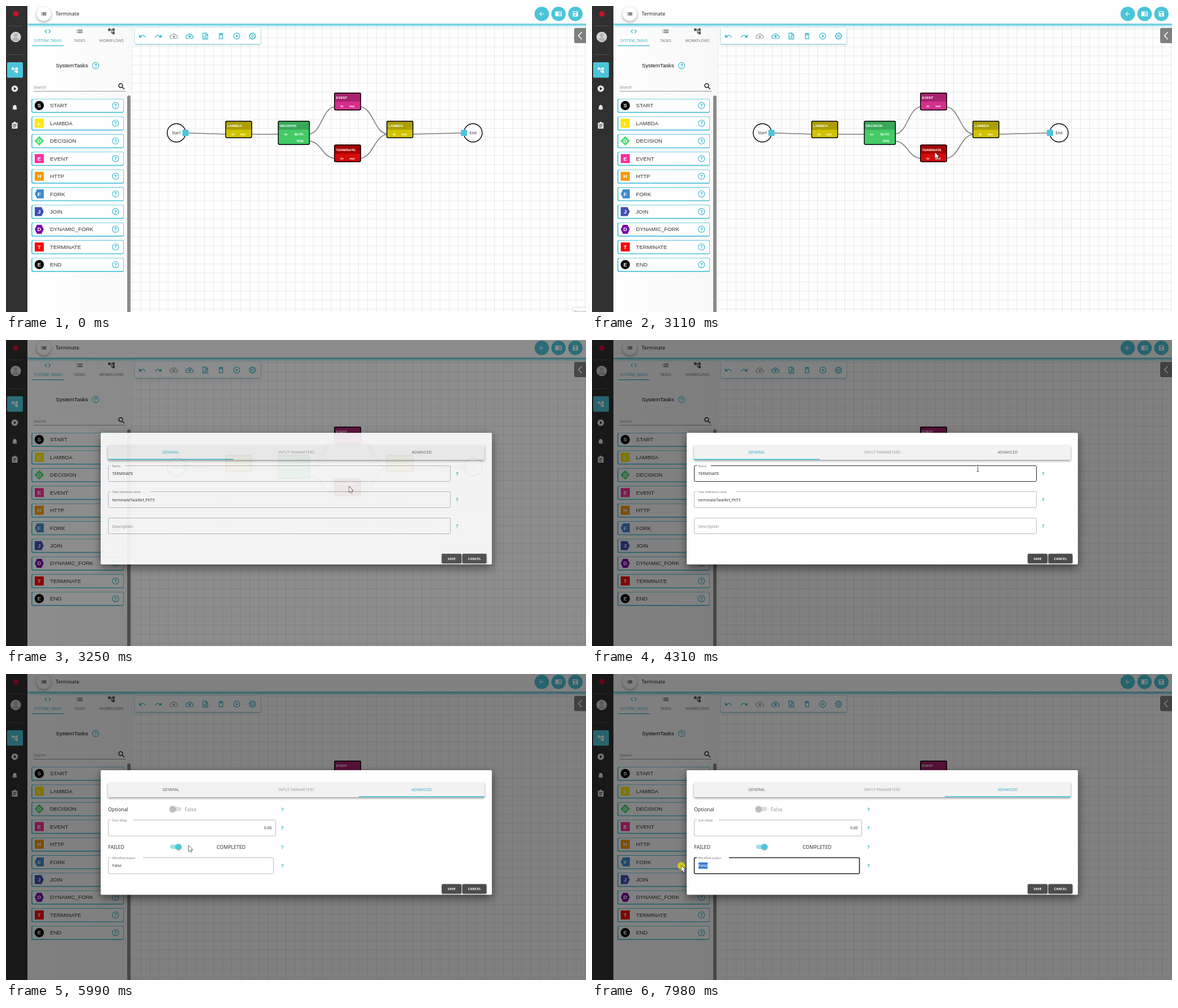
These frames come from a looping animation (1029x544 px, 8 s). An HTML page with a canvas:

```html
<!DOCTYPE html>
<html lang="en">
<head>
<meta charset="utf-8">
<title>Workflow builder</title>
<style>
html, body { margin: 0; width: 100%; height: 100%; overflow: hidden; background: #fff; }
canvas { display: block; width: 100vw; height: 100vh; }
</style>
</head>
<body>
<canvas id="stage" width="1029" height="544"></canvas>
<script>
const W = 1029, H = 544, LOOP = 8000;
const CYAN = '#4bc5da', TEAL = '#2fb5cb', DARK = '#333';
const SANS = '"Noto Sans", "Open Sans", sans-serif';
const ARIAL = '"Liberation Sans", Arial, sans-serif';
const screen = document.getElementById('stage').getContext('2d');
let g = screen;

function layer() {
  const c = document.createElement('canvas');
  c.width = W;
  c.height = H;
  return c.getContext('2d');
}

// ---------- drawing helpers ----------
function rect(x, y, w, h, color) {
  g.fillStyle = color;
  g.fillRect(x, y, w, h);
}
function rounded(x, y, w, h, r, fill, stroke, lw = 1) {
  g.beginPath();
  g.roundRect(x, y, w, h, r);
  paint(fill, stroke, lw);
}
function circle(x, y, r, fill, stroke, lw = 1) {
  g.beginPath();
  g.arc(x, y, r, 0, Math.PI * 2);
  paint(fill, stroke, lw);
}
function paint(fill, stroke, lw) {
  if (fill) { g.fillStyle = fill; g.fill(); }
  if (stroke) { g.strokeStyle = stroke; g.lineWidth = lw; g.stroke(); }
}
function shadow(color, blur, dy, draw) {
  g.save();
  g.shadowColor = color;
  g.shadowBlur = blur;
  g.shadowOffsetY = dy;
  draw();
  g.restore();
}
// y is the middle of the capital letters
function text(s, x, y, size, color, align = 'left', font = SANS, weight = 400) {
  g.font = `${weight} ${size}px ${font}`;
  g.fillStyle = color;
  g.textAlign = align;
  g.fillText(s, x, y + size * 0.36);
}

// Icons on a 24 unit grid: [stroked path, filled path]
const RING = 'M21 12a9 9 0 1 1-18 0a9 9 0 1 1 18 0z';
const CLOUD = 'M6 19a5 5 0 0 1 0-10a7 7 0 0 1 13 2a4 4 0 0 1 0 8z';
const ICONS = {
  undo: ['M6 13q9-8 15 3', 'M2 7v9h9z'],
  redo: ['M18 13q-9-8-15 3', 'M22 7v9h-9z'],
  upload: [CLOUD, 'M12 9l5 5h-3v3h-4v-3h-3z'],
  download: [CLOUD, 'M12 17l5-5h-3v-3h-4v3h-3z'],
  doc: ['M5 3h9l5 5v13h-14zM13 3v6h6M8 13h8M8 17h8', ''],
  bin: ['M7 8h10v12h-10zM5 5h14M9 4h6', ''],
  play: [RING, 'M10 7.5l6 4.5l-6 4.5z'],
  tree: ['M9 7h6M12 7v10h4', 'M2 3h7v8h-7zM15 3h7v8h-7zM15 13h7v8h-7z'],
  list: ['M7 8h14M7 12h14M7 16h14M3 8h2M3 12h2M3 16h2', ''],
  code: ['M9 6l-6 6l6 6M15 6l6 6l-6 6', ''],
  search: ['M15 9.5a5.5 5.5 0 1 1-11 0a5.5 5.5 0 1 1 11 0zM14 14l6 6', ''],
  back: ['M20 12h-15M12 5l-7 7l7 7', ''],
  book: ['M2 5h20v14h-20zM14 10h6M14 13h6M14 16h6', 'M2 5h10v14h-10z'],
  bell: ['', 'M4 19v-1l2-2v-5q0-6 6-7q6 1 6 7v5l2 2v1zM10 20h4q-2 4-4 0z'],
};
function icon(name, x, y, size, color, lw = 2) {
  const [line, solid] = ICONS[name];
  g.save();
  g.translate(x - size / 2, y - size / 2);
  g.scale(size / 24, size / 24);
  g.strokeStyle = g.fillStyle = color;
  g.lineWidth = lw;
  g.stroke(new Path2D(line));
  g.fill(new Path2D(solid));
  g.restore();
}
function help(x, y) {
  circle(x, y, 5.6, null, TEAL, 1.1);
  text('?', x, y, 8.5, TEAL, 'center', ARIAL, 700);
}
function gear(x, y) {
  g.beginPath();
  for (let i = 0; i < 32; i++) {
    const r = i % 4 < 2 ? 5.8 : 4.4, a = (i + 0.5) * Math.PI / 16;
    g.lineTo(x + r * Math.cos(a), y + r * Math.sin(a));
  }
  g.closePath();
  paint(null, TEAL, 1.2);
  circle(x, y, 1.8, null, TEAL, 1.1);
}

// ---------- page ----------
function drawGrid() {
  const pitch = 16.08;
  rect(38, 32, W, H, '#fff');
  for (let x = 38 + pitch / 2; x < W; x += pitch) rect(x, 32, 1, H, '#e9e9e9');
  for (let y = 32 + pitch / 2; y < H; y += pitch) rect(38, y, W, 1, '#e9e9e9');
}

// Links run between port centres, which sit just inside the node edges
function link(x1, y1, x2, y2, bend = 0) {
  g.beginPath();
  g.moveTo(x1 - 4, y1);
  g.bezierCurveTo(x1 - 4 + bend, y1, x2 + 4 - bend, y2, x2 + 4, y2);
  paint(null, '#7a7a7a', 1.6);
}

function node(x, y, w, h, title, head, body, outs) {
  rounded(x, y, w, h, 3, body);
  rounded(x, y, w, 16, [3, 3, 0, 0], head);
  rounded(x + 0.7, y + 0.7, w - 1.4, h - 1.4, 2.5, null, '#000', 1.4);
  text(title, x + 3.5, y + 9, 6, '#fff', 'left', ARIAL, 700);
  text('in', x + 14, y + 24, 6, '#fff', 'center', ARIAL, 700);
  outs.forEach((s, i) => text(s, x + w - 11.5, y + 24 + i * 12, 6, '#fff', 'right', ARIAL, 700));
}

function terminal(x, label, portX) {
  circle(x, 225.5, 16.3, '#fff', '#000', 1.4);
  text(label, x, 225.5, 7, DARK, 'center');
  rounded(portX, 220, 11, 11, 1.5, CYAN);
}

function drawDiagram() {
  link(319, 225.5, 390, 228);
  link(436, 228, 483, 228);
  link(539, 228, 582, 179, 27);
  link(539, 240, 582, 271, 27);
  link(630, 179, 675, 228, 27);
  link(630, 271, 675, 228, 27);
  link(722, 228, 812, 225.5);
  terminal(302.3, 'Start', 313);
  terminal(828.5, 'End', 807);
  node(389, 204, 47.5, 31, 'LAMBDA', '#ab9f00', '#d3c400', ['out']);
  node(482.5, 204, 56.5, 43, 'DECISION', '#38a858', '#43cc66', ['BLTO', 'TDN']);
  node(582, 154, 48, 31.5, 'EVENT', '#a9226f', '#d42e8d', ['out']);
  node(582, 246.5, 48, 31, 'TERMINATE', '#a60000', '#d60a0a', ['out']);
  node(675, 204, 47.5, 31, 'LAMBDA', '#ab9f00', '#d3c400', ['out']);
}

function drawSidebar() {
  rect(0, 0, 38, H, '#303030');
  circle(17.5, 14, 5, '#c4122f');
  rect(3, 35, 27, 1, '#505050');
  rect(3, 86, 27, 1, '#505050');
  circle(17.2, 55, 9.3, '#d4d4d4');
  circle(17.2, 52, 3.4, '#b4b4b4');
  g.beginPath();
  g.arc(17.2, 62, 6, Math.PI, 0);
  paint('#b4b4b4');
  rounded(2, 100, 28, 27.5, 2, CYAN);
  icon('tree', 15.5, 114, 13, '#fff');
  circle(15.5, 147, 5.8, '#e8e8e8');
  g.fillStyle = '#303030';
  g.fill(new Path2D('M14 144l4.4 3l-4.4 3z'));
  icon('bell', 15.5, 180, 13, '#e8e8e8');
  rounded(10.5, 207.5, 10, 10.5, 1, '#e8e8e8');
  circle(15.5, 207.3, 1.7, '#e8e8e8');
  for (let i = 0; i < 3; i++) rect(12.5, 210 + i * 2.4, i < 2 ? 6 : 4, 1, '#303030');
}

const TASKS = [
  ['START', '#000', 'circle'], ['LAMBDA', '#ffe600', 'square'], ['DECISION', '#4ade73', 'diamond'],
  ['EVENT', '#fb2d9c', 'square'], ['HTTP', '#f79a05', 'square'], ['FORK', '#3f8ad2', 'left'],
  ['JOIN', '#3f51b5', 'right'], ['DYNAMIC_FORK', '#7b09a5', 'hex'],
  ['TERMINATE', '#f80404', 'square'], ['END', '#000', 'circle'],
];
const SHAPES = {
  diamond: 'M0-8.5L8.5 0L0 8.5L-8.5 0z',
  square: 'M-8-8h16v16h-16z',
  left: 'M-4-8h12v16h-12l-4-8z',
  right: 'M-8-8h12l4 8l-4 8h-12z',
  hex: 'M-4-8h8l4 8l-4 8h-8l-4-8z',
};

function drawTask([name, color, shape], i) {
  const y = 177 + i * 31.42;
  rounded(45, y - 12, 164, 25, 3, CYAN);
  rounded(46.7, y - 11.2, 161.5, 22.5, 2.5, '#fff');
  if (shape === 'circle') circle(59, y, 8.2, color);
  else {
    g.save();
    g.translate(59, y);
    g.fillStyle = color;
    g.fill(new Path2D(SHAPES[shape]));
    g.restore();
  }
  text(name[0], 59, y, 9.5, '#fff', 'center', ARIAL, 700);
  text(name, 78, y, 9.7, '#333', 'left', ARIAL);
  help(194.3, y);
}

function drawPanel() {
  const tint = g.createLinearGradient(38, 0, 222, 0);
  tint.addColorStop(0, '#fff');
  tint.addColorStop(1, '#f9f9f9');
  rect(38, 32, 184, H - 32, tint);
  icon('code', 74, 45, 13, TEAL);
  icon('list', 130.5, 45, 14, '#555');
  icon('tree', 187, 45, 14, '#555');
  text('SYSTEM_TASKS', 74.5, 61.5, 7, TEAL, 'center');
  text('TASKS', 130.7, 61.5, 7, '#777', 'center');
  text('WORKFLOWS', 187, 61.5, 7, '#777', 'center');
  rect(46, 70, 56.5, 1.2, TEAL);
  text('SystemTasks', 88.5, 106, 9.7, '#111', 'left', ARIAL);
  help(159, 106);
  text('Search', 49, 144.5, 7, '#888');
  icon('search', 205, 143, 15, '#222', 2.4);
  rect(49, 151, 163, 1, '#999');
  TASKS.forEach(drawTask);
  rounded(215, 159, 6, H, 3, '#8a8a8a');
}

function drawHeader() {
  shadow(CYAN, 5, 1.5, () => rect(38, 0, W, 33, CYAN));
  rect(38, 0, W, 31.5, '#fff');
  shadow('rgba(0,0,0,.35)', 5, 2, () => circle(67, 14, 12.7, '#fff'));
  icon('list', 67, 14, 12, '#222', 2.4);
  text('Terminate', 88, 14, 8.8, '#222');
  ['back', 'book'].forEach((name, i) => {
    circle(950.5 + i * 29.8, 14, 12.8, CYAN);
    icon(name, 950.5 + i * 29.8, 14, 12.5, '#fff');
  });
  circle(1010.2, 14, 12.8, CYAN);
  rounded(1005.5, 9.3, 9.4, 9.4, [1, 3, 1, 1], '#fff');
  rect(1006.8, 10.4, 5.6, 2.2, CYAN);
  circle(1010.2, 15.8, 1.6, CYAN);
}

function drawToolbar() {
  shadow('rgba(40,150,170,.7)', 3, 1, () => rounded(228.5, 39, 223, 28.5, 1, '#fff'));
  const names = ['undo', 'redo', 'upload', 'download', 'doc', 'bin', 'play'];
  names.forEach((n, i) => icon(n, 242 + i * 27.9, 53.5, 14.5, n === 'upload' ? '#a5a5a5' : TEAL));
  gear(437.3, 53.5);
  rounded(1008, 39, 24, 27, 3, '#808080');
  g.beginPath();
  g.moveTo(1021.5, 46.5);
  g.lineTo(1015.5, 52.7);
  g.lineTo(1021.5, 59);
  paint(null, '#fff', 1.6);
}

function drawPage() {
  drawGrid();
  drawDiagram();
  drawToolbar();
  drawPanel();
  drawHeader();
  drawSidebar();
}

// ---------- timing ----------
// Busy stretches: start, end, number of picture updates
const BURSTS = [
  [0, 0, 1], [70, 70, 1], [530, 1130, 9], [1270, 1390, 2], [1720, 2280, 9], [2680, 2890, 4],
  [3110, 3370, 5], [3900, 4560, 10], [4960, 5720, 12], [5790, 6540, 11], [6610, 6610, 1],
  [6750, 6950, 3], [7090, 7840, 12], [7910, 7980, 2],
];
function snap(t) {
  const [a, b, n] = BURSTS.filter(s => s[0] <= t).pop();
  if (n < 2) return a;
  const dt = (b - a) / (n - 1);
  return a + dt * Math.min(n - 1, Math.floor((t - a) / dt + 1e-6));
}

const clamp = v => Math.max(0, Math.min(1, v));

// cubic-bezier(.4, 0, .2, 1)
function ease(x) {
  x = clamp(x);
  let lo = 0, hi = 1;
  for (let i = 0; i < 20; i++) {
    const s = (lo + hi) / 2, q = 1 - s;
    if (1.2 * q * q * s + 0.6 * q * s * s + s * s * s < x) lo = s;
    else hi = s;
  }
  return 3 * lo * lo - 2 * lo * lo * lo;
}

// Pointer stops: time, x, y
const PATH = [
  [530, 1018, 541], [680, 880, 462], [830, 785, 408], [980, 736, 383], [1130, 717.5, 374.5],
  [1270, 716.5, 374.5], [1390, 717.5, 374.5], [1650, 717.5, 374.5], [1790, 683, 345],
  [1930, 633.5, 300.5], [2070, 616, 275], [2280, 608.5, 260.5], [3830, 608.5, 260.5],
  [4230, 678, 232], [4560, 736.5, 199.5], [5240, 736.5, 199.5], [5480, 540, 252],
  [5720, 391, 291], [5930, 325, 305], [6130, 302, 307], [6540, 301, 307], [6610, 301, 307.5],
  [7160, 301, 307.5], [7400, 212, 341], [7500, 212, 341], [7840, 179, 341], [7980, 158.5, 341],
];
function pointerAt(t) {
  const i = PATH.findIndex(p => p[0] >= t);
  if (i <= 0) return i ? PATH[PATH.length - 1].slice(1) : PATH[0].slice(1);
  const a = PATH[i - 1], b = PATH[i], k = (t - a[0]) / (b[0] - a[0]);
  return [a[1] + (b[1] - a[1]) * k, a[2] + (b[2] - a[2]) * k];
}

const PRESSES = [[2680, 2750], [2820, 2890], [4960, 5130], [6220, 6350], [6950, 7090], [7500, LOOP]];
const pressed = t => PRESSES.some(([a, b]) => t >= a && t < b);

const within = ([px, py], x, y, w, h) => px >= x && px <= x + w && py >= y && py <= y + h;

// ---------- dialog ----------
const TAB_SWITCH = 5137, TAB_READY = 3200;
const FIELDS = [
  [[181, 223.5, 607.5, 28], [181, 269.5, 607.5, 28.5], [181, 316.5, 607.5, 28]],
  [[181, 259.5, 297.5, 28.5], [181, 326.5, 293.5, 28.5]],
];

function field(box, label, gap, hover, focus) {
  const [x, y, w, h] = box;
  rounded(x + 0.5, y, w - 0.5, h, 2, null, hover || focus ? '#222' : '#b9b9b9', focus ? 1.6 : 1);
  if (label) {
    rect(x + 5, y - 1.5, gap - x - 5, 3, '#fff');
    text(label, x + 7.5, y + 0.5, 5.2, '#777');
  }
}
const mark = (x, y) => text('?', x, y, 9, TEAL, 'center', SANS, 700);

function button(x, y, w, label) {
  shadow('rgba(0,0,0,.4)', 3, 1, () => rounded(x, y, w, 17, 2, '#4c4c4c'));
  text(label, x + w / 2, y + 8.5, 5.9, '#fff', 'center', SANS, 600);
}

function toggle(y, on, colors, halo) {
  const x = 295.5 + on * 10.5;
  rounded(291, y - 3.7, 20, 7.4, 3.7, colors.track);
  if (halo) circle(x, y, 9.5, 'rgba(60,50,20,.07)');
  shadow('rgba(0,0,0,.4)', 2, 0.7, () => circle(x, y, 5.4, colors.knob));
}

function drawTabs(y, t, tab) {
  shadow('rgba(0,0,0,.4)', 4, 2, () => rect(181, y, 668, 26.5, '#f2f2f2'));
  const r = 112 * ease((t - 4960) / 550);
  const fade = 1 - ease((t - TAB_SWITCH) / 550);
  if (t >= 4960 && fade > 0) {
    g.save();
    g.beginPath();
    g.rect(626, y, 223, 26.5);
    g.clip();
    circle(736, y + 13, r, `rgba(75,197,218,${0.28 * fade})`);
    g.restore();
  }
  const slide = 445 * ease((t - TAB_SWITCH) / 300);
  if (t >= TAB_READY) rect(181 + slide, y + 24.8, 223, 1.7, CYAN);
  text('GENERAL', 292.3, y + 13.2, 6.8, tab ? '#666' : TEAL, 'center');
  text('INPUT PARAMETERS', 515, y + 13.2, 6.8, '#a0a0a0', 'center');
  text('ADVANCED', 737.5, y + 13.2, 6.8, tab ? TEAL : '#666', 'center');
}

function drawGeneral(at) {
  const boxes = FIELDS[0], labels = ['Name', 'Task reference name', ''], gaps = [211, 256, 0];
  boxes.forEach((b, i) => {
    field(b, labels[i], gaps[i], within(at, ...b));
    mark(800.5, b[1] + 14.3);
  });
  text('TERMINATE', 188.7, 238, 6.8, DARK);
  text('terminateTaskRef_PKT5', 188.7, 284.3, 6.8, DARK);
  text('Description', 188.7, 332, 6.8, '#8a8a8a');
}

function drawAdvanced(t, at) {
  const [delay, output] = FIELDS[1];
  text('Optional', 181, 240.5, 8.8, DARK);
  toggle(240, 0, { track: '#dedede', knob: '#bdbdbd' });
  text('False', 317, 240.5, 8.8, '#999');
  field(delay, 'Start delay', 225, within(at, ...delay));
  text('0.00', 471.5, 274, 6.8, DARK, 'right');

  text('FAILED', 181, 307.5, 8.8, DARK);
  const on = t < 7090 ? 1 - ease((t - 6350) / 150) : ease((t - 7020) / 150);
  const colors = on > 0.5 ? { track: '#a0dfea', knob: CYAN } : { track: '#9c9c9c', knob: '#fafafa' };
  toggle(307.3, on, colors, within(at, 286, 298, 30, 19));
  text('COMPLETED', 373.7, 307.5, 8.8, DARK);

  field(output, 'Workflow output', 243, within(at, ...output), t >= 7500);
  text('False', 188.7, 341, 6.8, DARK);
  if (t > 7500) {
    const left = Math.max(188.7, at[0]);
    if (left < 205) {
      g.save();
      g.beginPath();
      g.rect(left, 335, 205 - left, 11.5);
      g.clip();
      rect(left, 335, 205 - left, 11.5, '#3a7bd5');
      text('False', 188.7, 341, 6.8, '#fff');
      g.restore();
    }
  }
  [240.5, 274, 307.5, 341].forEach(y => mark(490.3, y));
}

function drawDialog(t, at) {
  const tab = t >= TAB_SWITCH;
  const top = tab ? 171 : 165, bottom = tab ? 392.5 : 399;
  shadow('rgba(0,0,0,.5)', 16, 6, () => rounded(168, top, 694, bottom - top, 2, '#fff'));
  drawTabs(top + 21.5, t, tab);
  if (tab) drawAdvanced(t, at);
  else drawGeneral(at);
  button(773, bottom - 19, 35, 'SAVE');
  button(809.5, bottom - 19, 43, 'CANCEL');
}

// ---------- pointer ----------
const POINTERS = {
  arrow: 'M0 0v10l2.4-2.2l1.6 3.6l1.6-.7l-1.6-3.5h3.2z',
  hand: 'M-1 0q1.2-1 2 0v5l4 1q1.2.3 1 1.6l-.8 4.4h-5.2l-3.4-4q0-1.6 1.6-.8l.8.6z',
  move: 'M0-6.5l2.3 2.6h-1.5v3.1h3.1v-1.5l2.6 2.3l-2.6 2.3v-1.5h-3.1v3.1h1.5l-2.3 2.6l-2.3-2.6h1.5v-3.1h-3.1v1.5l-2.6-2.3l2.6-2.3v1.5h3.1v-3.1h-1.5z',
  beam: 'M-2-5h1.6v10h-1.6v.8h4v-.8h-1.6v-10h1.6v-.8h-4z',
};
function pointerKind(t, at) {
  if (t < 3110) return 'move';
  const tab = t >= TAB_SWITCH;
  if (within(at, 181, tab ? 193 : 186.5, 668, 26.5)) return 'hand';
  if (tab && within(at, 286, 298, 30, 19)) return 'hand';
  return FIELDS[+tab].some(b => within(at, ...b)) ? 'beam' : 'arrow';
}
function drawPointer(t, at) {
  if (t < 530) return;
  if (pressed(t)) circle(at[0], at[1], 6.7, 'rgba(255,238,0,.65)');
  const kind = pointerKind(t, at), shape = new Path2D(POINTERS[kind]);
  g.save();
  g.translate(...at);
  g.lineJoin = 'round';
  g.lineWidth = 1.2;
  g.strokeStyle = kind === 'beam' ? '#fff' : '#222';
  g.fillStyle = kind === 'beam' ? '#222' : '#fff';
  g.stroke(shape);
  g.fill(shape);
  if (kind === 'move') circle(0, 0, 0.8, '#222');
  g.restore();
}

// ---------- frame ----------
const page = layer(), dialog = layer();
g = page;
drawPage();

function render(time) {
  const t = snap(time), at = pointerAt(t);
  g = screen;
  g.drawImage(page.canvas, 0, 0);
  if (t < 530) {
    rounded(1005.5, 535.5, 40, 20, 1, '#fff', '#d8d8d8');
    if (t < 70) text('Record', 1008, 543.5, 6.5, '#999');
  }
  if (t >= 2680 && t < 2890) rounded(582.8, 247.3, 46.4, 29.4, 2.5, null, '#00c0ff', 1.6);

  const shown = ease((t - 3097) / 225);
  if (shown > 0) {
    rect(0, 0, W, H, `rgba(0,0,0,${0.5 * shown})`);
    g = dialog;
    g.clearRect(0, 0, W, H);
    drawDialog(t, at);
    g = screen;
    g.globalAlpha = shown;
    g.drawImage(dialog.canvas, 0, 0);
    g.globalAlpha = 1;
  }
  drawPointer(t, at);
}

const start = performance.now();
function tick() {
  render((performance.now() - start) % LOOP);
  requestAnimationFrame(tick);
}
tick();
</script>
</body>
</html>
```
